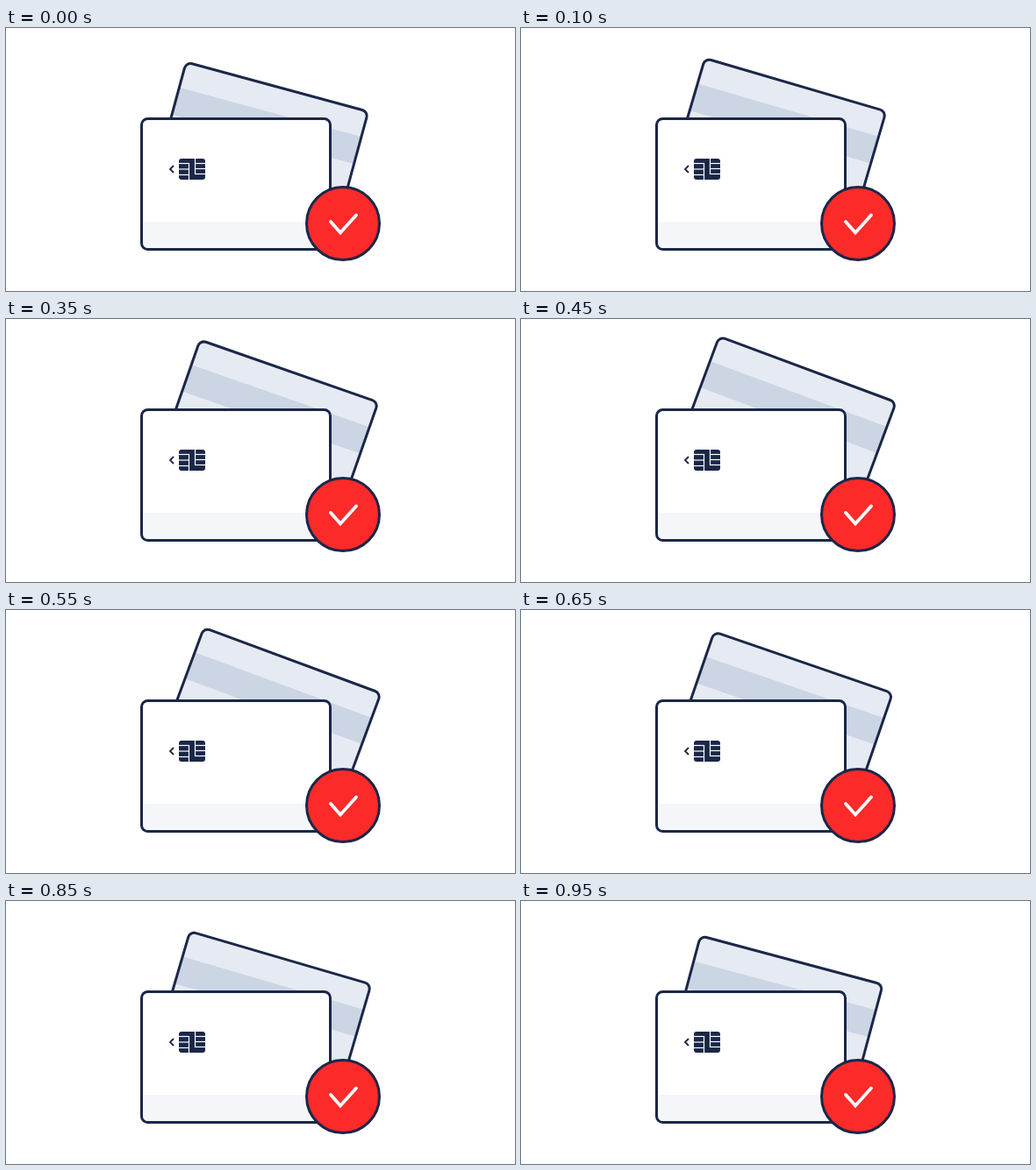
An HTML page with a canvas that plays this animation: 580 by 300 pixels, repeating every 1000 ms.

```html
<!DOCTYPE html>
<html lang="en">
<head>
<meta charset="utf-8">
<title>Cards</title>
<style>
  html, body { margin: 0; width: 100%; height: 100%; overflow: hidden; background: #fff; }
  canvas { display: block; }
</style>
</head>
<body>
<canvas id="stage" width="580" height="300"></canvas>
<script>
const ctx = document.getElementById('stage').getContext('2d');
const NAVY = '#1a2748', RED = '#fd2a2a', WHITE = '#fff';
const LOOP = 1000, STEP = 50, PEAK = 500, END = 950;
const CARD_W = 218, CARD_H = 152, LINE = 3;

// Linear swing up, then a slightly quicker linear return.
function swing(t) {
  return t <= PEAK ? 0.03 + 0.97 * t / PEAK : 1 - (t - PEAK) / (END - PEAK);
}

function line(points, color, width, cap = 'butt') {
  ctx.beginPath();
  points.forEach(([x, y]) => ctx.lineTo(x, y));
  ctx.strokeStyle = color;
  ctx.lineWidth = width;
  ctx.lineCap = cap;
  ctx.stroke();
}

function card(x, y, fill, bandColor, bandTop, bandH) {
  const h = LINE / 2;
  ctx.beginPath();
  ctx.roundRect(x + h, y + h, CARD_W - LINE, CARD_H - LINE, 7);
  ctx.fillStyle = fill;
  ctx.fill();
  ctx.save();
  ctx.clip();
  ctx.fillStyle = bandColor;
  ctx.fillRect(x, y + bandTop, CARD_W, bandH);
  ctx.restore();
  ctx.strokeStyle = NAVY;
  ctx.lineWidth = LINE;
  ctx.stroke();
}

function backCard(p) {
  ctx.save();
  ctx.translate(424, 255);
  ctx.rotate((15 + 6 * p) * Math.PI / 180);
  card(-269.2, -152.7, '#e6eaf3', '#ccd5e4', 31.5, 32);
  ctx.restore();
}

function chip() {
  ctx.beginPath();
  ctx.roundRect(197, 149, 30, 24, 3);
  ctx.fillStyle = NAVY;
  ctx.fill();
  for (const y of [154.5, 161, 167.5]) line([[197, y], [209, y]], WHITE, 1.2);
  for (const y of [154.5, 160.5, 166.5]) line([[215, y], [227, y]], WHITE, 1.2);
  line([[208.5, 154], [208.5, 173]], WHITE, 1.2);
  line([[215.5, 149], [215.5, 167]], WHITE, 1.2);
  line([[191, 157], [187, 161], [191, 165]], NAVY, 1.8);
}

function badge() {
  ctx.beginPath();
  ctx.arc(384, 223, 41.5, 0, Math.PI * 2);
  ctx.fillStyle = RED;
  ctx.fill();
  ctx.strokeStyle = NAVY;
  ctx.lineWidth = LINE;
  ctx.stroke();
  line([[370, 221], [381, 233.5], [399, 213.5]], WHITE, 3.8, 'round');
}

function draw(now) {
  const t = Math.floor(now % LOOP / STEP) * STEP;
  ctx.fillStyle = WHITE;
  ctx.fillRect(0, 0, 580, 300);
  backCard(swing(t));
  card(153, 102, WHITE, '#f5f6fa', 119, 33);
  chip();
  badge();
}

const start = performance.now();
function tick() {
  draw(performance.now() - start);
  requestAnimationFrame(tick);
}
tick();
</script>
</body>
</html>
```
